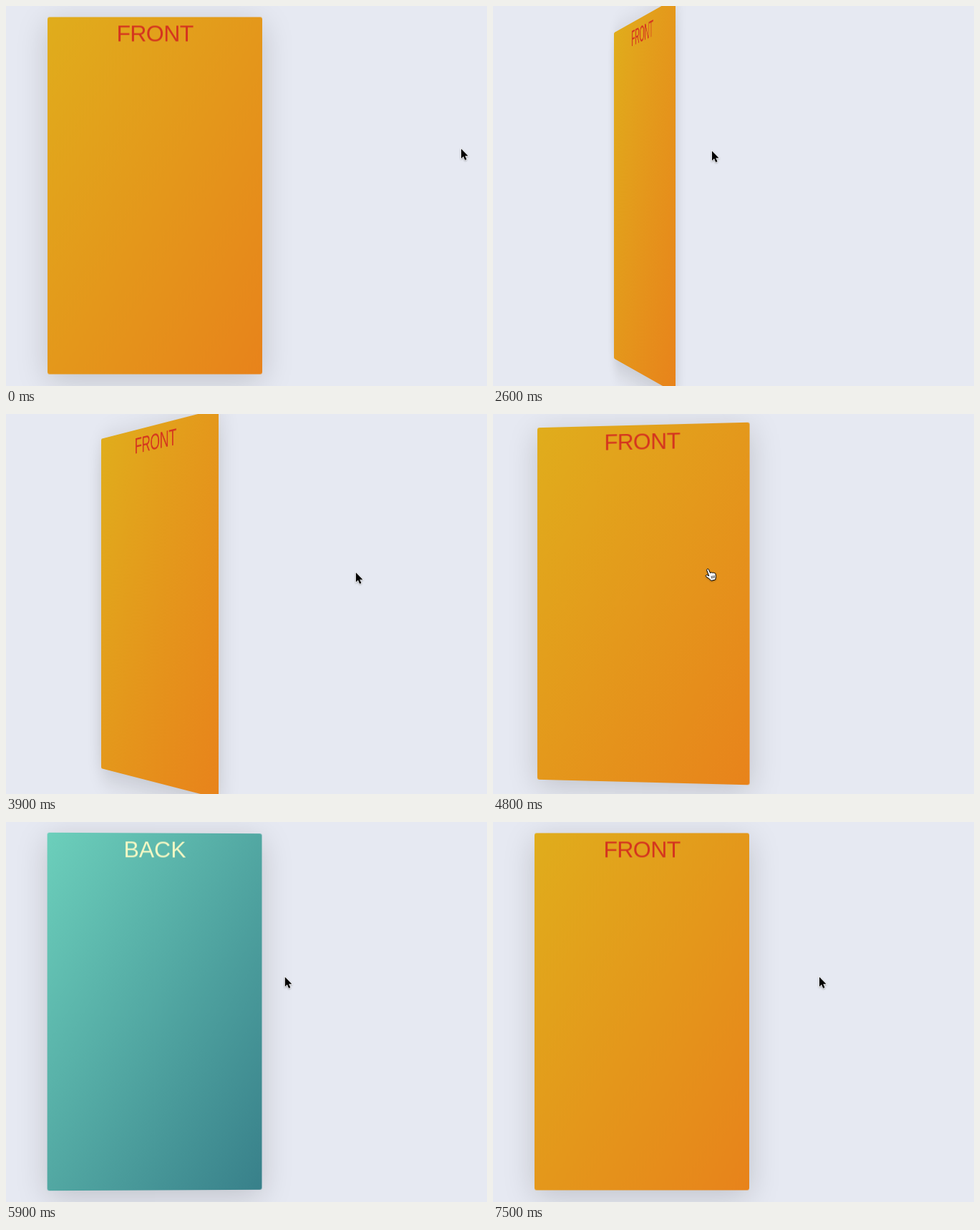
An HTML page for the animation above (7.6 s loop, 672 by 532 pixels).

```html
<!DOCTYPE html>
<html lang="en">
<head>
<meta charset="utf-8">
<title>Flip card</title>
<style>
  html, body { margin: 0; width: 100%; height: 100%; overflow: hidden; background: #e6e9f2; }
  .scene { position: absolute; left: 58px; top: 15px; width: 300px; height: 500px; perspective: 1500px; }
  #card { width: 100%; height: 100%; transform-style: preserve-3d; }
  .face {
    position: absolute; inset: 0; border-radius: 3px; backface-visibility: hidden;
    font: 32px/47px "Liberation Sans", Arial, sans-serif; text-align: center;
    box-shadow: 0 9px 44px rgba(0, 0, 0, .17);
  }
  .front { color: #d4341f; letter-spacing: -.6px; background: linear-gradient(to bottom right, #e0ad1c, #e8831b); }
  .back { color: #f5f8c4; background: linear-gradient(to bottom right, #6ccfbb, #38808a); transform: rotateY(180deg); }
  #cursor { position: absolute; left: 0; top: 0; width: 1px; height: 1px; overflow: visible; filter: drop-shadow(0 1px 1px rgba(0, 0, 0, .3)); }
</style>
</head>
<body>
<div class="scene">
  <div id="card">
    <div class="face front">FRONT</div>
    <div class="face back">BACK</div>
  </div>
</div>
<svg id="cursor">
  <path id="arrow" d="M0 0V13.4L3 10.6 5.2 15.8 7.5 14.8 5.3 9.8H9.5Z" stroke="#fff" stroke-width="1.2" paint-order="stroke"/>
  <g id="hand" fill="#fff" stroke="#000" stroke-linejoin="round" stroke-linecap="round">
    <path d="M-1.3 1.6C-1.7 0 .6 -.9 1.4 .8L3.6 5.8C4 4.4 5.9 4.3 6.4 5.7 7 4.6 8.5 4.8 8.9 6 9.7 5.2 10.8 5.8 11 7L11.4 10.5C11.5 12.3 10.8 13.2 10.6 15L4.8 16.4C3.6 14.4 .4 12.6 -2.2 10.6 -3.6 9.4 -2.2 7.9 -.8 8.5L1.4 9.6Z"/>
    <path d="M5 10.2L5.8 13M7 9.8L7.7 12.6M9 9.3L9.5 12" stroke-width=".8"/>
  </g>
</svg>
<script>
const LOOP = 7600, STEP = 100, FLIP = 800, DEPTH = 1500, CENTER = 208, HALF = 150;
const $ = id => document.getElementById(id);

// Each flip turns the card to the other side
const flipStarts = [2400, 3580, 4748, 5885];

// Pointer glides from its starting point
const origin = { x: 636, y: 200 };
const glides = [
  { from: 200, to: 1100, x: 558, y: 168 },
  { from: 2100, to: 2600, x: 306, y: 203 },
  { from: 2600, to: 3200, x: 297, y: 209 },
  { from: 3450, to: 3950, x: 490, y: 222 },
  { from: 4600, to: 4800, x: 300, y: 217 },
  { from: 5800, to: 6100, x: 456, y: 217 }
];

const bezier = (a, b, u) => 3 * a * u * (1 - u) ** 2 + 3 * b * u * u * (1 - u) + u ** 3;
const mix = (a, b, k) => a + (b - a) * k;

// CSS "ease", solved by bisection
function ease(t) {
  if (t <= 0 || t >= 1) return t <= 0 ? 0 : 1;
  let lo = 0, hi = 1;
  for (let i = 0; i < 24; i++) {
    const mid = (lo + hi) / 2;
    if (bezier(.25, .25, mid) < t) lo = mid; else hi = mid;
  }
  return bezier(.1, 1, lo);
}

const angleAt = t => flipStarts.reduce(
  (angle, start, i) => mix(angle, i % 2 ? 0 : -180, ease((t - start) / FLIP)), 0);

const pointerAt = t => glides.reduce((p, g) => {
  const k = ease((t - g.from) / (g.to - g.from));
  return { x: mix(p.x, g.x, k), y: mix(p.y, g.y, k) };
}, origin);

// Screen position of the right-hand edge of the turned card
function rightEdge(angle) {
  const a = angle * Math.PI / 180, c = Math.cos(a);
  const z = -Math.sin(a) * HALF * Math.sign(c);
  return CENTER + HALF * Math.abs(c) * DEPTH / (DEPTH - z);
}

function draw() {
  const t = Math.floor((performance.now() + 8) / STEP) * STEP % LOOP;
  const angle = angleAt(t), { x, y } = pointerAt(t);
  const over = x < rightEdge(angle);
  $("card").style.transform = `translateY(.5px) rotateY(${angle}deg)`;
  $("cursor").style.transform = `translate(${x}px, ${y}px)`;
  $("hand").style.display = over ? "" : "none";
  $("arrow").style.display = over ? "none" : "";
  requestAnimationFrame(draw);
}
draw();
</script>
</body>
</html>
```
